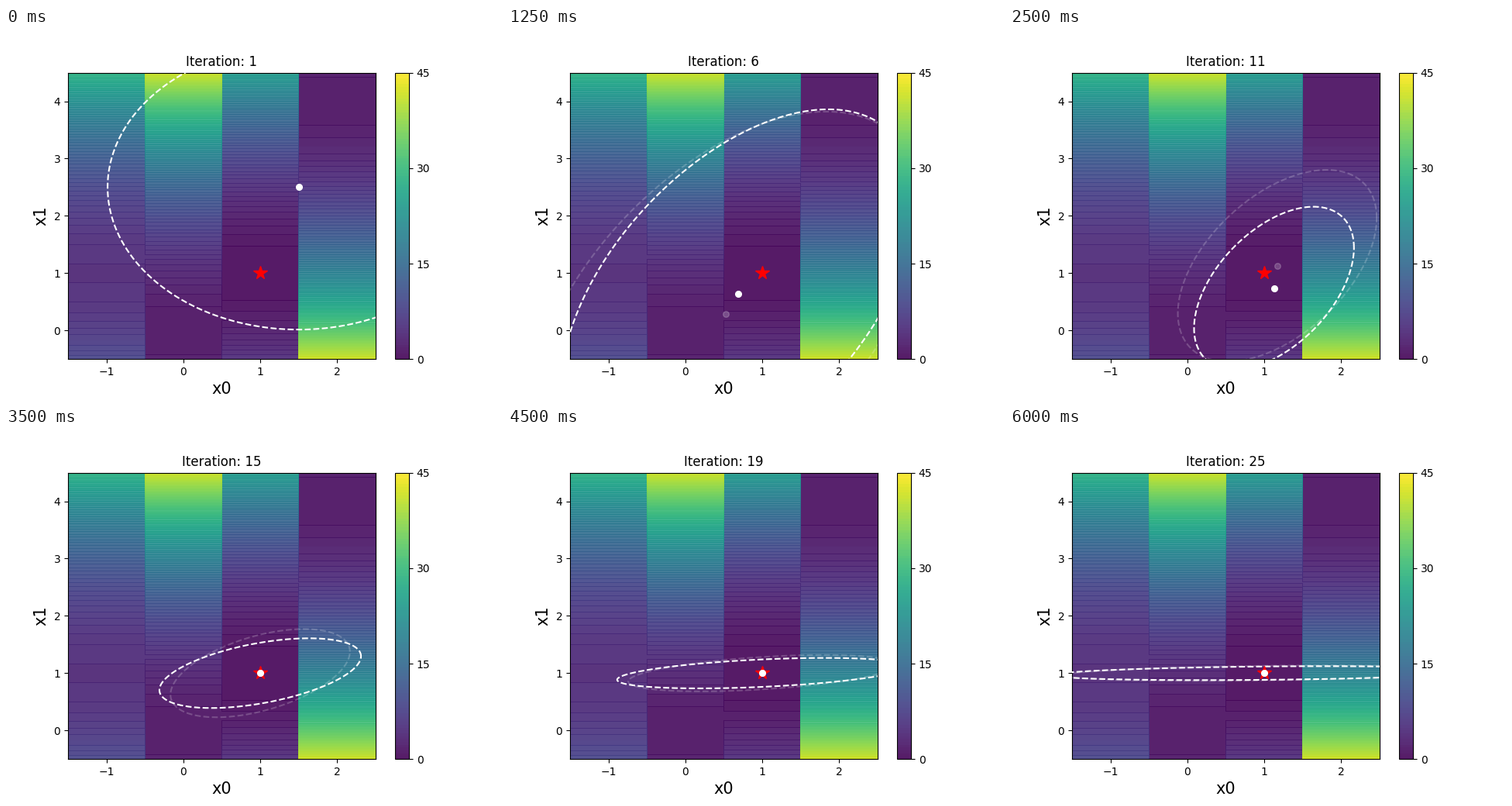
A matplotlib script that plays this animation: 640x480 px, repeating every 6.25 s.

```python
import numpy as np
import matplotlib.pyplot as plt
from matplotlib.animation import FuncAnimation

STEPS = 25
theta = np.linspace(0, 2 * np.pi, 361)


def objective(x, y):
    k = np.round(x)
    return 2 * (y - k**2) ** 2 + (k - 1) ** 2


def center(n):
    """Mean of the search: overshoots, then settles on the optimum."""
    x = np.interp(n, [1, 4, 5, 6, 10, 14], [1.5, 1.05, 0.53, 0.69, 1.17, 1])
    y = np.interp(n, [1, 4, 5, 6, 10, 11, 14],
                  [2.5, 1.2, 0.29, 0.64, 1.13, 0.74, 1])
    return x, y


def ellipse(n):
    """Spread of the search: widens along x0 while shrinking along x1."""
    x, y = center(n)
    sx = np.interp(n, [1, 4, 5, 11, 14, 25],
                   [2.485, 1.62, 2.56, 1.04, 1.167, 2.75])
    sy = np.exp(np.interp(n, [1, 4, 5, 6, 11, 14, 17, 21, 25],
                          np.log([2.485, 2.2, 3.53, 3.22, 1.42,
                                  0.77, 0.38, 0.186, 0.122])))
    tilt = np.arcsin(np.interp(n, [1, 5, 17, 25], [0, 0.51, 0.48, 0.29]))
    return x + sx * np.cos(theta), y + sy * np.sin(theta + tilt)


fig, ax = plt.subplots(figsize=(6.4, 4.8), dpi=100)

# The field is constant in x within a column, so its two borders suffice
xs = np.array([k + s for k in range(-1, 3) for s in (-0.499, 0.499)])
xs[0], xs[-1] = -1.5, 2.5
X, Y = np.meshgrid(xs, np.linspace(-0.5, 4.5, 1001))
Z = objective(np.clip(X, -1, 2), Y)
field = ax.contourf(X, Y, Z, levels=np.linspace(0, 45, 101),
                    cmap="viridis", alpha=0.9)
fig.colorbar(field, ax=ax, ticks=[0, 15, 30, 45])

ax.set_xlim(-1.5, 2.5)
ax.set_ylim(-0.5, 4.5)
ax.set_xticks(range(-1, 3))
ax.set_yticks(range(5))
ax.set_xlabel("x0", fontsize=15)
ax.set_ylabel("x1", fontsize=15)
title = ax.set_title("")
ax.plot(1, 1, "*", color="red", ms=13, zorder=4)


def make_marker(alpha):
    ring, = ax.plot([], [], "--", color="white", lw=1.5, alpha=alpha, zorder=3)
    dot, = ax.plot([], [], "o", color="white", ms=5.5, alpha=alpha, zorder=5)
    return ring, dot


def place(marker, n):
    ring, dot = marker
    x, y = center(n)
    ring.set_data(*ellipse(n))
    dot.set_data([x], [y])


past = make_marker(0.2)
now = make_marker(1)


def update(i):
    n = i + 1
    title.set_text(f"Iteration: {n}")
    place(now, n)
    place(past, n - 1)
    for artist in past:
        artist.set_visible(n > 1)
    return [title, *now, *past]


anim = FuncAnimation(fig, update, frames=STEPS, interval=250,
                     repeat=True, repeat_delay=0, blit=False)
plt.show()
```
